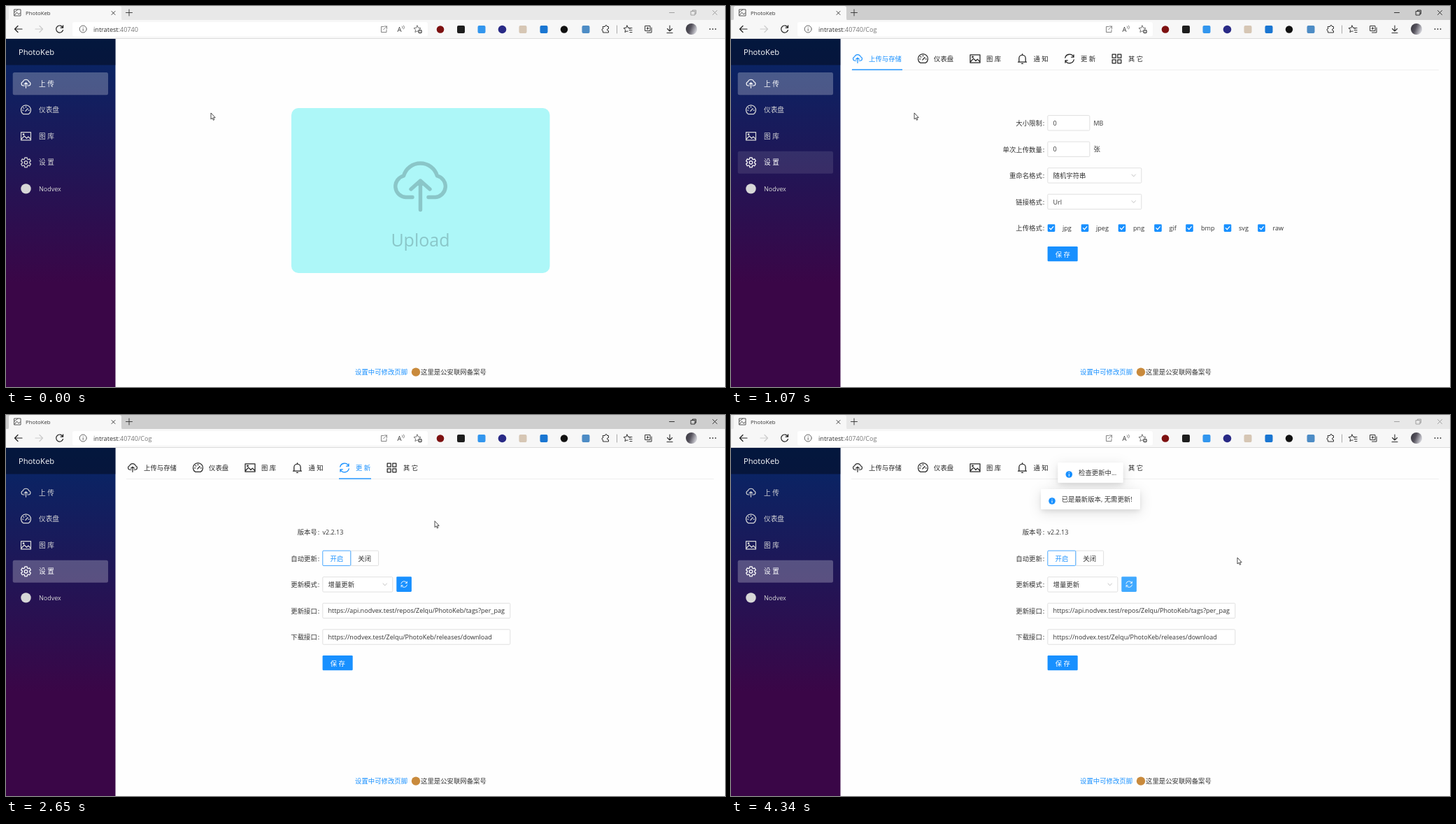
An HTML page for the animation above (4.41 s loop, 1028 by 545 pixels).

```html
<!DOCTYPE html>
<html lang="zh-CN">
<head>
<meta charset="utf-8">
<title>PhotoKeb</title>
<style>
  html, body { margin: 0; width: 100%; height: 100%; overflow: hidden; background: #fefefe; }
  svg { display: block; }
  #stage { width: 1028px; height: 545px; }
  text { font: 9.4px "Open Sans", "Noto Sans CJK SC", "Noto Sans CJK", sans-serif; fill: #333; white-space: pre; }
  .line { fill: none; stroke: currentColor; stroke-linecap: round; stroke-linejoin: round; }
  .box { fill: #fff; stroke: #d9d9d9; stroke-width: .8; }
  .card { fill: #fff; filter: drop-shadow(0 3px 3px rgba(0,0,0,.07)) drop-shadow(0 4px 9px rgba(0,0,0,.12)); }
</style>
</head>
<body>
<svg id="stage" viewBox="0 0 1028 545" xmlns="http://www.w3.org/2000/svg"></svg>
<script>
const LOOP = 4410, BLUE = '#1890ff', HOT = '#40a9ff', INK = '#262626';
const stage = document.getElementById('stage');

// Markup helpers
const label = (x, y, s, o = '') => `<text x="${x}" y="${y}" ${o}>${s}</text>`;
const size = n => `style="font-size:${n}px"`;
const rect = (x, y, w, h, o = '') => `<rect x="${x}" y="${y}" width="${w}" height="${h}" ${o}/>`;
const disc = (x, y, r, fill) => `<circle cx="${x}" cy="${y}" r="${r}" fill="${fill}"/>`;
const line = (d, color, w = 1) => `<path class="line" d="${d}" color="${color}" stroke-width="${w}"/>`;
const icon = (id, x, y, s = 16) => `<use href="#${id}" x="${x - s / 2}" y="${y - s / 2}" width="${s}" height="${s}"/>`;
const symbol = (id, d) =>
  `<symbol id="${id}" viewBox="0 0 24 24"><path class="line" stroke-width="1.9" d="${d}"/></symbol>`;

const cloud = 'M581 273.5H571.5A15.5 15.5 0 0 1 568.5 243A25 25 0 0 1 616.5 243' +
  'A15.5 15.5 0 0 1 614 273.5H604M592.5 291.5V250M579 262L592.5 250L606 262';

function gearPath() {
  const pts = [];
  for (let k = 0; k < 6; k++) {
    for (const [deg, r] of [[-21, 8], [-13, 10.8], [13, 10.8], [21, 8]]) {
      const a = (k * 60 + 30 + deg) * Math.PI / 180;
      pts.push((12 + r * Math.cos(a)).toFixed(2) + ' ' + (12 + r * Math.sin(a)).toFixed(2));
    }
  }
  return 'M' + pts.join('L') + 'ZM15.5 12a3.5 3.5 0 1 1-7 0a3.5 3.5 0 1 1 7 0';
}

const defs = `<defs>
  <linearGradient id="night" x1="0" y1="0" x2="0" y2="1">
    <stop offset="0" stop-color="#052767"/><stop offset=".7" stop-color="#3a0647"/></linearGradient>
  <linearGradient id="portrait" x1="0" y1="0" x2="1" y2=".4">
    <stop offset="0" stop-color="#33333b"/><stop offset=".5" stop-color="#55525c"/><stop offset="1" stop-color="#c9c9d0"/></linearGradient>
  <clipPath id="field"><rect x="454" y="270" width="259.5" height="20"/></clipPath>
  <symbol id="cloud" viewBox="0 0 24 24"><path class="line" stroke-width="6.4" d="${cloud}"
    transform="translate(12 12) scale(.27) translate(-592.5 -258)"/></symbol>
  ${symbol('dash', 'M6 20.7A10.5 10.5 0 1 1 18 20.7ZM11 14.5L16 9M12 4.8v1.7M4.8 12.5h1.7M17.5 12.5h1.7M6.7 7.2l1.2 1.2')}
  ${symbol('image', 'M1.5 3.5h21v17h-21zM2.5 18l6-6.5l5 5l3.5-3.5l5 5M8 8a1.2 1.2 0 1 1-2.4 0a1.2 1.2 0 1 1 2.4 0')}
  ${symbol('gear', gearPath())}
  ${symbol('bell', 'M12 1.8v2M5 19V11a7 7 0 0 1 14 0v8M3 19h18M10.5 22.3h3')}
  ${symbol('sync', 'M2.6 10A9.6 9.6 0 0 1 20.6 8M21 3.5v5h-5M21.4 14A9.6 9.6 0 0 1 3.4 16M3 20.5v-5h5')}
  ${symbol('grid', 'M2.5 2.5h7.5v7.5h-7.5zM14 2.5h7.5v7.5h-7.5zM2.5 14h7.5v7.5h-7.5zM14 14h7.5v7.5h-7.5z')}
</defs>`;

// Browser frame
const star = (x, y) => `M${x} ${y - 5}l1.5 3.2l3.5.4l-2.6 2.4l.7 3.5l-3.1-1.7l-3.1 1.7l.7-3.5l-2.6-2.4l3.5-.4z`;
const chip = (x, color) => rect(x - 5.5, 28, 11, 11, `rx="2" fill="${color}"`);
const chrome = `
  <rect id="strip" width="1028" height="20"/>
  ${rect(0, 20, 1028, 26.5, 'fill="#f7f7f7"')}
  ${rect(0, 46, 1028, 1, 'fill="#dcdcdc"')}
  <path d="M2 20.5Q4 20.5 4 17V3Q4 0 7 0H162Q165 0 165 3V17Q165 20.5 167 20.5Z" fill="#f7f7f7"/>
  ${line('M12 5h9v9h-9zM12.5 13l3-4l2.5 3l2.5-2M12 9l5-4', '#555')}
  ${label(28, 12.5, 'PhotoKeb', size(7.8))}
  ${line('M151 7.5l5 5m0-5l-5 5M176 5v9M171.5 9.5h9', '#333', .9)}
  <g id="controls">${line('M948.5 9.5h7M979.5 7.5h5.5v5.5h-5.5zM981.5 7.5V6h5v5.2h-1.5M1010.5 6.5l6 6m0-6l-6 6', 'currentColor', .9)}</g>
  ${line('M12.5 33h10.5M17 28.5L12.5 33L17 37.5', '#222', 1.2)}
  ${line('M42 33h10.5M48 28.5L52.5 33L48 37.5', '#ccc', 1.2)}
  ${line('M81.3 31A5 5 0 1 0 81.5 34.5M81.6 27.8v3.4h-3.4', '#222', 1.2)}
  ${rect(95, 23, 508, 20.5, 'rx="3" fill="#fff"')}
  ${line('M115.2 33a5 5 0 1 1-10 0a5 5 0 1 1 10 0M110.2 32.5v3M110.2 30.4v.1', '#555', .9)}
  <text x="125" y="36.8" ${size(9.1)}>intratest<tspan fill="#777">:40740</tspan><tspan id="path" fill="#777">/Cog</tspan></text>
  ${line('M540 29.5h-3.5v8h7.5v-3.5M541 29h3.5v3.5M544.5 29l-5 5', '#777', .9)}
  ${label(559.5, 37, 'A', size(9.5))}
  ${line('M566.5 29q1.5 1.5 0 3M568.5 28q2.5 2.5 0 5', '#666', .8)}
  ${line(star(588, 33), '#666', .9)}${disc(592, 36.5, 3, '#666')}${line('M590.5 36.5h3M592 35v3', '#fff', .8)}
  ${disc(621, 33.5, 5.3, '#7d1010')}${chip(650.5, '#1d1d1d')}${chip(680, '#3296ee')}
  ${disc(709.5, 33.5, 5.8, '#292a86')}${chip(739, '#d6c6b4')}${chip(769, '#1976d2')}
  ${disc(798, 33.5, 5.2, '#111')}${chip(829, '#4d8cc5')}
  ${line('M853.5 29.5h3q0-2 1.5-2t1.5 2h2v3q-2 0-2 1.5t2 1.5v2.5h-8v-2.5q-1.5 0-1.5-1.5t1.5-1.5z', '#333')}
  ${line('M873.5 28v11', '#aaa')}
  ${line(star(888, 33), '#333')}${rect(889.5, 33, 8, 6, 'fill="#f7f7f7"')}${line('M890 31.5h5M891 34.5h4M892 37.5h3', '#333')}
  ${line('M914 28.5h7v7h-7zM923 31v7h-6.5M917.5 30.5v3M916 32h3', '#333')}
  ${line('M949 28v8M945.5 32.5L949 36L952.5 32.5M945 38.5h8', '#333', 1.1)}
  ${disc(980, 33, 8, 'url(#portrait)')}
  ${[1006.5, 1010.5, 1014.5].map(x => disc(x, 33, .9, '#333')).join('')}`;

// Sidebar
const menu = [['cloud', '上 传'], ['dash', '仪表盘'], ['image', '图 库'], ['gear', '设 置'], ['', 'Nodvex']];
const sidebar = `
  ${rect(0, 47, 156.5, 498, 'fill="url(#night)"')}
  ${rect(0, 47, 156.5, 37.5, 'fill="#000" opacity=".4"')}
  ${label(18, 70, 'PhotoKeb', 'style="font-size:11.2px;fill:#fff"')}
  ${menu.map(([id, name], i) => {
    const y = 111.2 + i * 37.55;
    return `<g class="item" color="#d7d7d7">${rect(9.7, y - 16.2, 136.3, 32.2, 'rx="2.5" fill="#fff" opacity="0"')}
      ${id ? icon(id, 28.5, y) : disc(28.5, y, 7.2, 'currentColor')}
      ${label(47, y + 3.6, name, `style="font-size:${id ? 9.7 : 9}px;fill:currentColor"`)}</g>`;
  }).join('')}`;

const footer = label(499, 526.8, '设置中可修改页脚', `style="fill:${BLUE}"`) +
  disc(586, 523.6, 6.2, '#c98a3c') + label(593, 526.8, '这里是公安联网备案号');

const upload = `<g id="upload">${rect(408, 146, 369.5, 236, 'rx="10" fill="#adf7f8"')}
  <path class="line" d="${cloud}" color="#8ac6c8" stroke-width="5.4"/>
  ${label(592.5, 344, 'Upload', 'text-anchor="middle" style="font-size:25px;fill:#8ac6c8"')}</g>`;

// Settings page
const tabs = [['cloud', 181, 197, '上传与存储'], ['dash', 274.5, 290, '仪表盘'], ['image', 349, 365, '图 库'],
  ['bell', 416.5, 432.5, '通 知'], ['sync', 484, 500, '更 新'], ['grid', 551.5, 568, '其 它']];
const LEFT = 452.8;
const rowY = i => 167.4 + i * 37.55;
const field = (i, s) => label(444.8, rowY(i) + 3.6, s, 'text-anchor="end"') + label(445.8, rowY(i) + 3.6, ':');
const input = (i, w, s = '', o = '') =>
  rect(LEFT, rowY(i) - 10.8, w, 21.4, 'class="box" rx="1.3"') + label(460.5, rowY(i) + 3.5, s, o);
const select = (i, w, s, o) => input(i, w, s, o) + line(`M${439 + w} ${rowY(i) - 1.5}l2.7 3l2.7-3`, '#bfbfbf', .9);
const types = [['jpg', 458, 474], ['jpeg', 506, 522], ['png', 559, 575], ['gif', 610.5, 626.5],
  ['bmp', 655.5, 672], ['svg', 710, 726], ['raw', 758.5, 774.5]];
const tick = ([s, x, tx]) => rect(x - 5.3, rowY(4) - 5.3, 10.6, 10.6, `rx="1.3" fill="${BLUE}"`) +
  line(`M${x - 2.6} ${rowY(4)}l2 2.1l3.4-4`, '#fff', 1.3) + label(tx, rowY(4) + 3.5, s, size(9.1));

const settings = `<g id="settings">
  ${rect(172, 91, 840, .8, 'fill="#ececec"')}
  ${tabs.map(([id, ix, tx, s]) => `<g class="tab" color="${INK}">${icon(id, ix, 75.5)}
    ${label(tx, 79.2, s, 'style="fill:currentColor"')}</g>`).join('')}
  <rect id="bar" y="90.4" height="1.4" fill="${BLUE}"/>
  <g id="storage">
    ${field(0, '大小限制')}${input(0, 60, '0', size(9))}${label(518.5, rowY(0) + 3.5, 'MB', size(8.8))}
    ${field(1, '单次上传数量')}${input(1, 60, '0', size(9))}${label(518.5, rowY(1) + 3.5, '张')}
    ${field(2, '重命名格式')}${select(2, 134, '随机字符串')}
    ${field(3, '链接格式')}${select(3, 134, 'Url', size(9))}
    ${field(4, '上传格式')}${types.map(tick).join('')}
  </g>
  <g id="update">
    ${field(0, '版本号')}${label(452.5, rowY(0) + 3.5, 'v2.2.13', size(9))}
    ${field(1, '自动更新')}${rect(492.8, rowY(1) - 10.8, 39.8, 21.4, 'class="box" rx="1.3"')}
    ${rect(LEFT, rowY(1) - 10.8, 40, 21.4, `rx="1.3" fill="#fff" stroke="${BLUE}" stroke-width=".8"`)}
    ${label(473, rowY(1) + 3.6, '开启', `text-anchor="middle" style="fill:${BLUE}"`)}
    ${label(512.7, rowY(1) + 3.6, '关闭', 'text-anchor="middle"')}
    ${field(2, '更新模式')}${select(2, 100, '增量更新', 'id="mode"')}
    <rect id="wave" fill="${BLUE}"/>
    ${rect(558.3, rowY(2) - 11.2, 21.6, 21.6, 'id="check" rx="1.3"')}
    <g color="#fff">${icon('sync', 569.2, 242.1, 11)}</g>
    ${field(3, '更新接口')}${input(3, 268)}
    <g clip-path="url(#field)">${label(460.5, rowY(3) + 3.4, 'https://api.nodvex.test/repos/Zelqu/PhotoKeb/tags?per_pag', size(9.05))}</g>
    ${field(4, '下载接口')}${input(4, 268, 'https://nodvex.test/Zelqu/PhotoKeb/releases/download', size(9.05))}
  </g>
  ${rect(452.6, 343.9, 43.1, 21.4, `rx="1.3" fill="${BLUE}"`)}
  ${label(474.3, 358.6, '保 存', 'text-anchor="middle" style="fill:#fff;font-weight:500"')}
</g>`;

// Overlays
const toast = (id, x, y, w, s) => `<g id="${id}">${rect(x, y, w, 29, 'class="card" rx="1.3"')}
  ${disc(x + 16, y + 17, 4.8, BLUE)}${line(`M${x + 16} ${y + 16.6}v2.7M${x + 16} ${y + 14.5}v.1`, '#fff', 1)}
  ${label(x + 29.7, y + 18.3, s)}</g>`;

const overlays = `
  <g id="tip"><path d="M545.5 200.3H594V222.6H573L569.5 226L566 222.6H545.5Z" fill="#404040"
    style="filter:drop-shadow(0 2px 4px rgba(0,0,0,.15))"/>
    ${label(569.7, 215, '检查更新', 'text-anchor="middle" style="fill:#fff"')}</g>
  ${toast('note1', 467.3, 68, 93.4, '检查更新中...')}
  ${toast('note2', 443, 106, 142, '已是最新版本, 无需更新!')}
  <g id="cursor" fill="#fff" stroke="#222" stroke-width=".8" stroke-linejoin="round">
    <path id="arrow" d="M0 0V9L2 7.2L3.4 10.3L4.8 9.7L3.5 6.7H6.2Z"/>
    <path id="hand" d="M-1 1Q0-.6 1 1V4.5L5 5.2Q6.5 5.6 6.3 7.5L5.4 12.5H-.3L-3.7 8.2Q-3.8 6.5-2.2 7.2L-1 8.2Z"/>
  </g>`;

stage.innerHTML = defs + rect(0, 0, 1028, 545, 'fill="#fefefe"') + sidebar + upload + settings + footer + chrome + overlays;

const $ = id => document.getElementById(id);
const items = stage.querySelectorAll('.item'), tabEls = stage.querySelectorAll('.tab');
const show = (id, on) => $(id).setAttribute('visibility', on ? 'inherit' : 'hidden');
const set = (el, attrs) => { for (const k in attrs) el.setAttribute(k, attrs[k]); };
const ramp = (t, start, span) => Math.min(1, Math.max(0, (t - start) / span));
const easeOut = p => 1 - (1 - p) ** 2;
const mix = (a, b, p) => a + (b - a) * p;

// Pointer path: time, x, y
const route = [[0, 293, 153], [70, 293, 153], [330, 190, 185], [530, 62, 222], [830, 62, 222], [930, 170, 190],
  [1010, 246, 163], [1070, 262, 153], [1270, 276, 146.5], [1400, 292, 133], [1610, 400, 95], [1750, 478, 61],
  [1900, 507, 69], [2160, 507, 69], [2300, 560, 95], [2440, 636, 140], [2570, 632, 147], [2650, 613.5, 151],
  [2710, 586, 190], [2780, 569, 242], [3300, 569, 242], [3410, 601.5, 229], [3500, 660, 212], [3600, 724, 204], [LOOP, 724, 204]];

function pointer(t) {
  const i = Math.max(1, route.findIndex(k => k[0] > t));
  const [a, b] = [route[i - 1], route[i]], p = ramp(t, a[0], b[0] - a[0]);
  return [mix(a[1], b[1], p), mix(a[2], b[2], p)];
}

function drop(id, p) {
  show(id, p > 0);
  set($(id), { opacity: p, transform: `translate(0 ${-37 * (1 - p)})` });
}

function draw(t) {
  const focused = t >= 140 && t < 4340;
  set($('strip'), { fill: focused ? '#cecece' : '#e8e8e8' });
  set($('controls'), { color: focused ? '#222' : '#999' });
  show('path', t >= 870);

  const chosen = t < 1140 ? 0 : 3;
  items.forEach((el, i) => {
    const hover = i === 3 && t >= 530;
    set(el, { color: i === chosen || hover ? '#fff' : '#d7d7d7' });
    set(el.firstChild, { opacity: i === chosen ? .25 : hover ? .1 : 0 });
  });

  show('upload', t < 1070);
  show('settings', t >= 1070);
  show('storage', t >= 1070 && t < 2090);
  show('update', t >= 2090);
  show('mode', t >= 2160);

  const [x, y] = pointer(t);
  const onTab = x > 476 && x < 522 && y > 66 && y < 88;
  const onCheck = x > 558 && x < 580 && y > 231 && y < 253;
  const hand = x < 150 || onTab || onCheck;
  set($('cursor'), { transform: `translate(${x} ${y})` });
  show('arrow', !hand);
  show('hand', hand);

  const picked = t < 2160 ? 0 : 4;
  tabEls.forEach((el, i) => set(el, { color: i === picked ? BLUE : i === 4 && onTab ? HOT : INK }));
  const slide = easeOut(ramp(t, 2200, 300));
  set($('bar'), { x: mix(173, 476, slide), width: mix(72, 46, slide) });

  set($('check'), { fill: t >= 2770 ? HOT : BLUE });
  const ripple = ramp(t, 3300, 400), grow = 4 * easeOut(ripple);
  set($('wave'), { x: 558.3 - grow, y: 231.3 - grow, width: 21.6 + 2 * grow, height: 21.6 + 2 * grow,
    rx: 1.3 + grow, opacity: t < 3300 ? 0 : .2 * (1 - ripple) });

  const tip = ramp(t, 2880, 100) * (1 - ramp(t, 3470, 100));
  show('tip', tip > 0);
  set($('tip'), { opacity: tip });
  drop('note1', easeOut(ramp(t, 3285, 190)));
  drop('note2', easeOut(ramp(t, 4250, 90)));
}

const begin = performance.now();
function loop() {
  draw((performance.now() - begin) % LOOP);
  requestAnimationFrame(loop);
}
loop();
</script>
</body>
</html>
```
